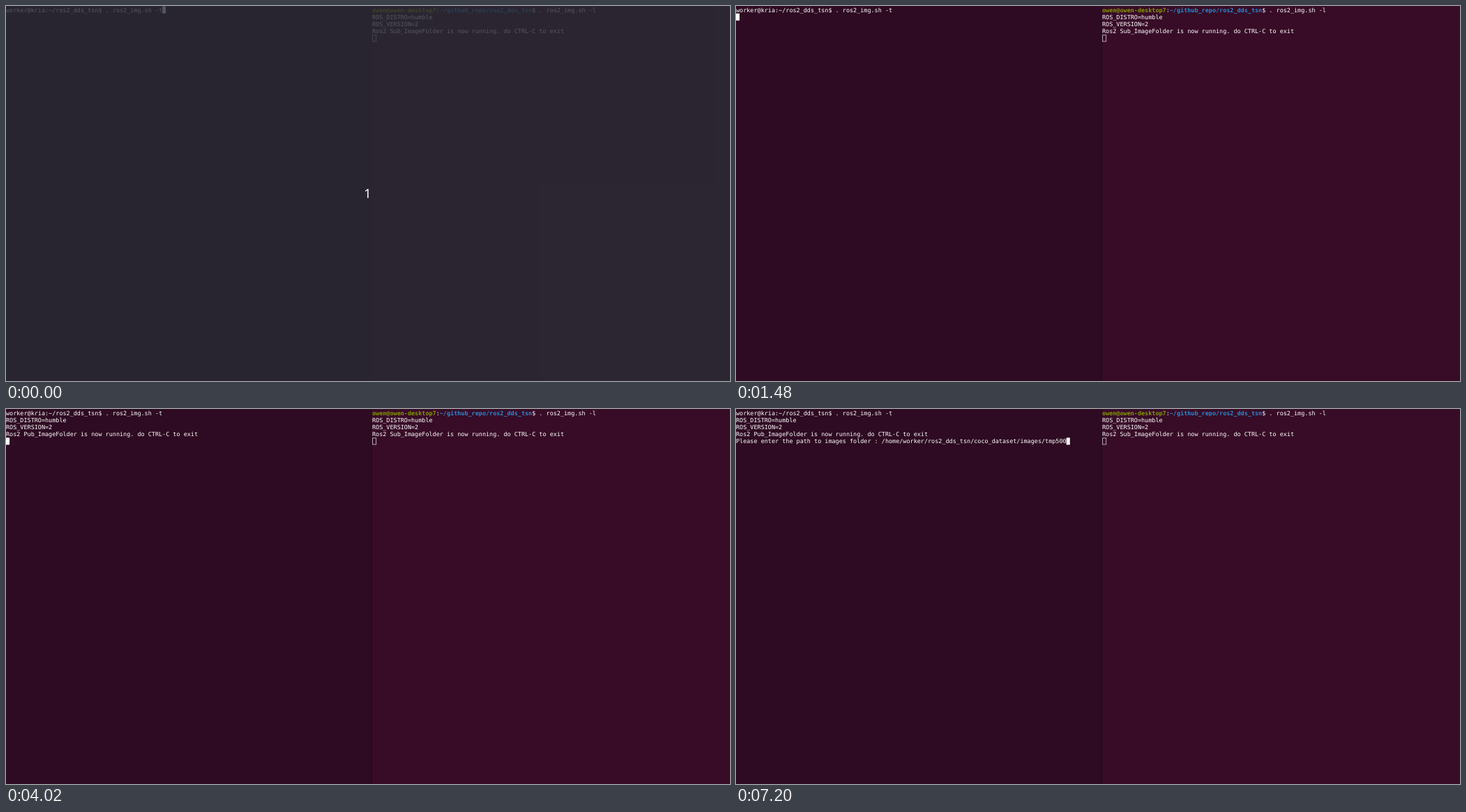
These frames come from a looping animation (1038 by 539 pixels, 8000 ms). An HTML page:

```html
<!DOCTYPE html>
<html lang="en">
<head>
<meta charset="utf-8">
<title>Terminal session</title>
<style>
  html, body { margin: 0; width: 100%; height: 100%; overflow: hidden; }
  body { position: relative; background: #380c27; }
  #left { position: absolute; inset: 0 auto 0 0; width: 524px; background: #2e0b22; border-right: 1px solid #220a19; }
  /* 10 x 20 character cells, scaled down as a whole */
  pre {
    position: absolute; top: .7px; left: 0; margin: 0;
    font: 16.61px/20px "DejaVu Sans Mono", monospace;
    color: #fff; text-rendering: geometricPrecision;
    transform: scale(.5093); transform-origin: 0 0;
  }
  #right { left: 525px; }
  b { color: #859900; }
  b.path { color: #268bd2; }
  i { display: inline-block; position: relative; top: -1px; width: 10px; height: 20px; vertical-align: top; background: #fff; }
  i.hollow { width: 12px; box-sizing: border-box; background: none; border: 2px solid #b5a5b0; }
  #cover {
    position: absolute; inset: 0; display: grid; place-items: center;
    background: rgba(40, 44, 52, .8); color: #fff;
    font: 18px "Noto Sans", sans-serif;
  }
  #cover span { transform: translate(-.5px, -1px); }
</style>
</head>
<body>
<div id="left"><pre><span id="out"></span><i></i></pre></div>
<pre id="right"><b>owen@owen-desktop7</b>:<b class="path">~/github_repo/ros2_dds_tsn</b>$ . ros2_img.sh -l
ROS_DISTRO=humble
ROS_VERSION=2
Ros2 Sub_ImageFolder is now running. do CTRL-C to exit
<i class="hollow"></i></pre>
<div id="cover"><span>1</span></div>
<script>
  const LOOP = 8000, COVER_END = 200;
  const out = document.getElementById("out");
  const cover = document.getElementById("cover");

  // Each entry is appended to the terminal at its time.
  const output = [
    [0, "worker@kria:~/ros2_dds_tsn$ . ros2_img.sh -t"],
    [1000, "\n"],
    [1800, "ROS_DISTRO=humble\nROS_VERSION=2\nRos2 Pub_ImageFolder is now running. do CTRL-C to exit\n"],
    [5500, "Please enter the path to images folder : "],
    [7200, "/home/worker/ros2_dds_tsn/coco_dataset/images/tmp500"],
  ];

  const start = performance.now();
  function draw() {
    const t = (performance.now() - start) % LOOP;
    const text = output.filter(([at]) => t >= at).map(([, s]) => s).join("");
    if (out.textContent !== text) out.textContent = text;
    cover.style.display = t < COVER_END ? "grid" : "none";
    requestAnimationFrame(draw);
  }
  draw();
</script>
</body>
</html>
```
